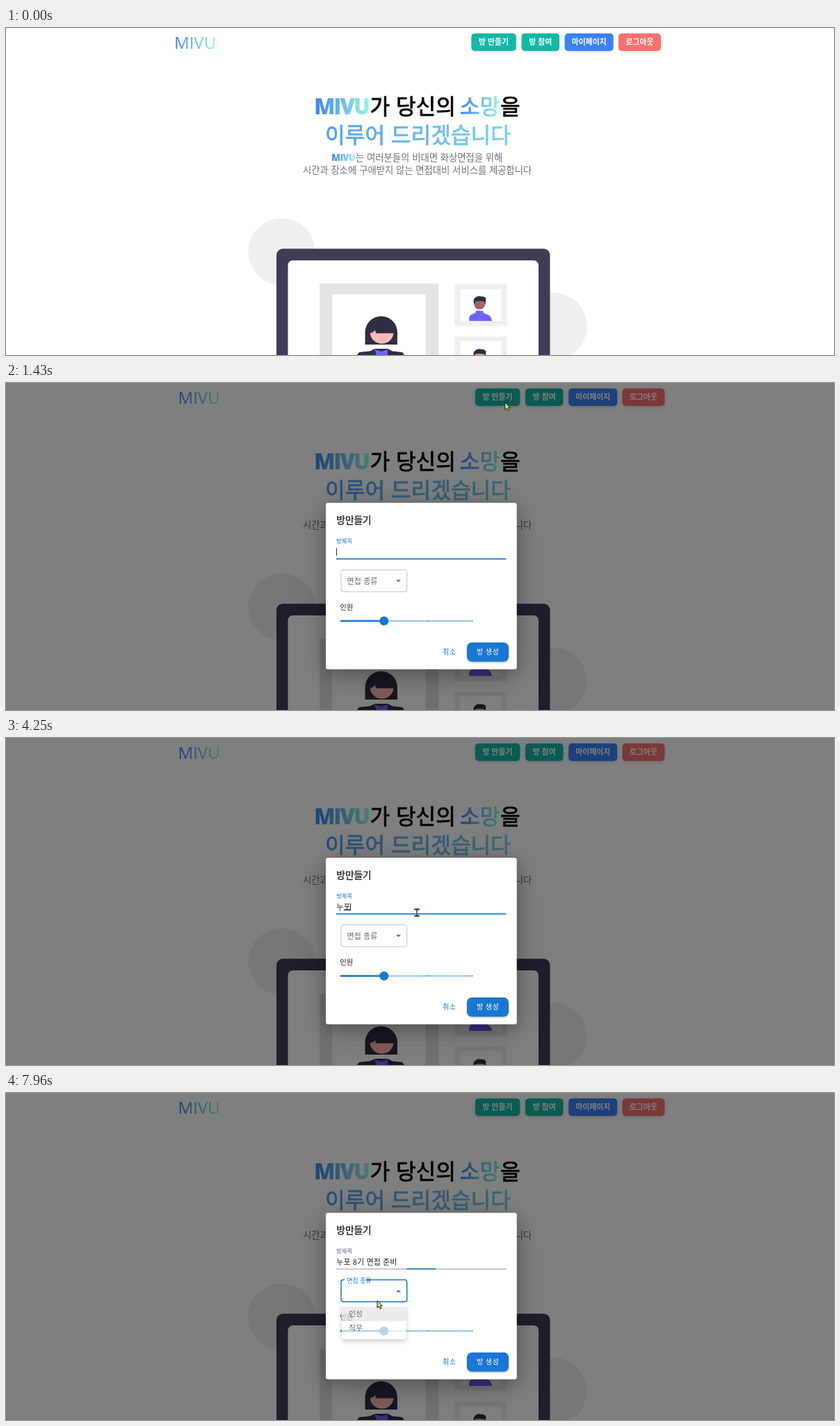
An HTML page for the animation above (8 s loop, 1191 by 470 pixels).

```html
<!DOCTYPE html>
<html lang="ko">
<head>
<meta charset="utf-8">
<title>방만들기</title>
<style>
  html, body { margin: 0; width: 100%; height: 100%; overflow: hidden; background: #fff; }
  svg { display: block; width: 1191px; height: 470px; }
  text { font-family: "Noto Sans CJK KR", "Noto Sans CJK JP", "Noto Sans CJK", sans-serif; white-space: pre; }
  .mark { font-family: "Open Sans", sans-serif; font-weight: 500; fill: url(#brand); }
  .heavy { font-weight: 800; letter-spacing: -.06em; text-anchor: end; stroke: none; }
  .hero { font-size: 31.2px; stroke: #000; stroke-width: .8px; }
  .sub { font-size: 13.35px; fill: #6b7280; }
  .nav text { font-size: 10.9px; font-weight: 700; fill: #fff; text-anchor: middle; }
  .nav rect { filter: drop-shadow(0 2px 2px rgba(0,0,0,.13)); }
  .field { font-size: 11px; letter-spacing: .1px; }
  .action { font-size: 10.2px; font-weight: 500; letter-spacing: .3px; text-anchor: middle; }
  .paper { fill: #fff; filter: drop-shadow(0 7px 10px rgba(0,0,0,.2)) drop-shadow(0 8px 24px rgba(0,0,0,.22)); }
  #menu .paper { filter: drop-shadow(0 3px 4px rgba(0,0,0,.3)); }
</style>
</head>
<body>
<svg viewBox="0 0 1191 470">
  <defs>
    <linearGradient id="brand"><stop stop-color="#3b82f6"/><stop offset="1" stop-color="#99f6e4"/></linearGradient>
    <linearGradient id="wide" href="#brand" gradientUnits="userSpaceOnUse" x1="311" x2="904"/>
  </defs>

  <g id="header">
    <text class="mark" x="242" y="30" font-size="24">MIVU</text>
    <g class="nav" id="nav"></g>
  </g>

  <g class="hero">
    <text class="mark heavy" x="522" y="124">MIVU</text>
    <text x="523.5" y="124">가 당신의</text>
    <text x="653" y="124" fill="url(#brand)" stroke="url(#brand)">소망</text>
    <text x="711" y="124">을</text>
    <text x="459" y="164.5" fill="url(#wide)" stroke="url(#wide)">이루어 드리겠습니다</text>
  </g>
  <g class="sub">
    <text class="mark heavy" x="502" y="191">MIVU</text>
    <text x="503" y="191">는 여러분들의 비대면 화상면접을 위해</text>
    <text x="427" y="208.8">시간과 장소에 구애받지 않는 면접대비 서비스를 제공합니다</text>
  </g>

  <g id="illustration">
    <g fill="#efefef"><circle cx="396.5" cy="321.5" r="48"/><circle cx="787.5" cy="428.5" r="48"/></g>
    <rect x="389" y="317.3" width="393.5" height="200" rx="9" fill="#3f3d56"/>
    <rect x="405.5" y="334" width="360.5" height="200" rx="7" fill="#fff"/>
    <path fill="#e4e4e4" d="M451 367.5h171V480H451z"/>
    <path fill="#fff" d="M469.3 382.5h134.5V480H469.3z"/>
    <path fill="#efefef" d="M645.5 368.5h75v60h-75zM645.5 443.5h75v60h-75z"/>
    <path fill="#fff" d="M653.5 375.5h59V421h-59zM653.5 450h59v45h-59z"/>
    <!-- interviewee -->
    <path fill="#2f2e41" d="M516.5 455V437.5a23.2 23.2 0 0 1 46.4 0V455z"/>
    <path fill="#ffb8b8" d="M523.7 438.5q4.5-.5 7.3-4.500l1 4.7h25.5a17 17 0 0 1-33.8 0z"/>
    <path fill="#2f2e41" d="M505 470l3-4 15-1.5 8-3.5h18l7 3.5 14 1.5 3 4z"/>
    <path fill="#6c63ff" d="M530 462l10 3 9-3v8h-16z"/>
    <!-- small portraits -->
    <path fill="#6c63ff" d="M666 421q0-8 3-9l6-2.5 2-3.5 9 .8 1 3 6 2.2q5 2 6 9z"/>
    <circle cx="681.2" cy="396.5" r="8" fill="#a0616a"/>
    <circle cx="681.2" cy="473" r="8" fill="#ffb8b8"/>
    <path id="hair" fill="#2f2e41" d="M673.5 398q-2.500-8 1.5-10.5 4-3 8-1.8 6-.5 7.5 3.5-.5 1-.6 8.8l-1.700-5q-6-1-9-.5-4-.5-4.500 1z"/>
    <use href="#hair" y="76"/>
  </g>

  <path id="backdrop" d="M0 0h1191v470H0z"/>
  <g id="dialog">
    <rect class="paper" x="460" y="172.3" width="274.7" height="239.2" rx="3"/>
    <text x="475.3" y="201.5" font-size="13.7" fill="#212121" stroke="#212121" stroke-width=".4">방만들기</text>
    <text class="field" id="titleLabel">방제목</text>
    <path d="M475 253h244.5" stroke="#000" stroke-opacity=".42"/>
    <path id="underline" d="M-122.2 252.7h244.4" stroke="#1976d2" stroke-width="1.5"/>
    <text class="field" id="entry" x="475.2" y="246.6" fill="#212121"></text>
    <path id="composing" stroke="#212121" stroke-width=".8"/>
    <path id="caret" d="M.5 237.5v10.5" stroke="#212121"/>

    <rect id="box" x="482" y="268.5" width="94.7" height="31.5" rx="3" fill="none"/>
    <rect id="notch" x="487" y="267" height="3" fill="#fff"/>
    <text class="field" id="typeLabel">면접 종류</text>
    <path id="arrow" d="M-3.5-1.7h7L0 1.8z" fill="#757575"/>

    <text x="480.3" y="325.7" font-size="10.3" font-weight="500" fill="#212121">인원</text>
    <path d="M481 342h190" stroke="#a7caed" stroke-width="2.7"/>
    <path d="M481 342h63" stroke="#1976d2" stroke-width="2.7"/>
    <path d="M606.5 341.3h1.3v1.3h-1.3zM670 341.3h1.3v1.3h-1.3z" fill="#1976d2"/>
    <circle cx="543.8" cy="342" r="6.5" fill="#1976d2"/>

    <text class="action" x="637.7" y="389.6" fill="#1976d2">취소</text>
    <rect x="663" y="373" width="60" height="27.5" rx="7" fill="#1976d2" style="filter:drop-shadow(0 1.5px 1.5px rgba(0,0,0,.3))"/>
    <text class="action" x="693" y="389.6" fill="#fff">방 생성</text>

    <g id="menu">
      <rect class="paper" x="-47.5" width="95" height="53" rx="3"/>
      <path d="M-47.5 4.5h95v21.5h-95z" fill="#e6e6e6"/>
      <g class="field" fill="#212121"><text x="-37" y="18.5">인성</text><text x="-37" y="40">직무</text></g>
    </g>
  </g>

  <g id="pointer">
    <path id="hand" d="M0 0v10.3l2.4-2 2 3.5 1.7-.9-1.8-3.3 3.2-.3z" fill="#d3e06c" stroke="#222"/>
    <g id="beam">
      <path d="M-3.8-4.8h7.6M-3.8 4.7h7.6M0-4.5v9" stroke="#333" stroke-width="2"/>
      <path d="M0-3.5v7" stroke="#c6d27a" stroke-width=".8"/>
    </g>
  </g>
</svg>
<script>
const LOOP = 8000, OPEN = 1190, BLUR = 7859;
const BLUE = '#1976d2';
const el = Object.fromEntries([...document.querySelectorAll('[id]')].map(e => [e.id, e]));
const set = (e, attrs) => { for (const k in attrs) e.setAttribute(k, attrs[k]); };
const show = (e, on) => e.style.display = on ? '' : 'none';
const clamp = v => Math.max(0, Math.min(1, v));
const mix = (a, b, p) => a + (b - a) * p;

el.nav.innerHTML = [
  ['방 만들기', 669.3, 64.5, '#14b8a6'], ['방 참여', 741.5, 54.5, '#14b8a6'],
  ['마이페이지', 803.7, 70, '#3b82f6'], ['로그아웃', 881, 61, '#f87171'],
].map(([label, x, w, color]) =>
  `<rect x="${x}" y="7.7" width="${w}" height="25.3" rx="5" fill="${color}"/>
   <text x="${x + w / 2}" y="24.3">${label}</text>`).join('');

// Progress along cubic-bezier(x1, 0, .2, 1)
function bezier(x1, p) {
  let lo = 0, hi = 1;
  for (let i = 0; i < 20; i++) {
    const u = (lo + hi) / 2, v = 1 - u;
    if (3 * v * v * u * x1 + .6 * v * u * u + u ** 3 < p) lo = u; else hi = u;
  }
  return lo * lo * (3 - 2 * lo);
}
const ease = x1 => (t, start, ms) =>
  t <= start ? 0 : t >= start + ms ? 1 : bezier(x1, (t - start) / ms);
const easeInOut = ease(.4), easeOut = ease(0);

// Hangul is composed one key at a time.
const keys = [
  [OPEN, ''], [3740, 'ㄴ'], [3840, '누'], [4150, '눞'], [4250, '누포'], [4550, '누포 '],
  [4750, '누포 8'], [4950, '누포 8ㄱ'], [5150, '누포 8기'], [5350, '누포 8기 '],
  ...['ㅁ', '며', '면', '멵', '면저', '면접', '면접 ', '면접 ㅈ']
    .map((s, i) => [5550 + i * 102.8, '누포 8기 ' + s]),
  ...[[6460, '주'], [6560, '준'], [6760, '준ㅂ'], [6860, '준비']]
    .map(([t, s]) => [t, '누포 8기 면접 ' + s]),
];

const route = [
  [300, 1172, 458], [1020, 717.7, 28], [1430, 717.7, 28], [1930, 591, 235],
  [2530, 591, 251], [7200, 591, 251], [7780, 534, 298.5],
];
function pointerAt(t) {
  const i = route.findIndex(stop => stop[0] > t);
  if (i < 0) return route[route.length - 1].slice(1);
  if (i === 0) return route[0].slice(1);
  const [t0, x0, y0] = route[i - 1], [t1, x1, y1] = route[i];
  const p = clamp((t - t0) / (t1 - t0)), e = p * p * (3 - 2 * p);
  return [mix(x0, x1, e), mix(y0, y1, e)];
}

const label = (e, x, y, scale, color) =>
  set(e, { transform: `translate(${x} ${y}) scale(${scale})`, fill: color });

function drawEntry(time) {
  const [pressed, text] = keys.filter(k => k[0] <= time).pop() || keys[0];
  const focused = time < BLUR;
  if (el.entry.textContent !== text) el.entry.textContent = text;
  const end = 475 + (text ? el.entry.getComputedTextLength() : 0);
  set(el.caret, { transform: `translate(${Math.round(end)})` });
  show(el.caret, focused && Math.floor((time - pressed) / 530) % 2 === 0);
  set(el.composing, { d: `M${end - 10} 247.6H${end - .5}` });
  show(el.composing, focused && /[^ 8]$/.test(text));
}

function drawField(t) {
  const raise = easeOut(t, OPEN, 200), leave = easeOut(t, BLUR, 200);
  const tone = [25, 118, 210].map(c => Math.round(mix(c, 102, leave)));
  label(el.titleLabel, 475.2, mix(247.3, 229.7, raise), mix(1, .75, raise), `rgb(${tone})`);
  set(el.underline, { transform: `translate(597.2) scale(${raise - leave} 1)` });
}

function drawSelect(t, x, y) {
  const open = t >= BLUR, raise = easeOut(t, BLUR, 200);
  const hover = x > 482 && x < 577 && y > 268 && y < 300;
  set(el.box, {
    stroke: open ? BLUE : hover ? '#212121' : '#c4c4c4',
    'stroke-width': open ? 1.5 : 1,
  });
  set(el.notch, { width: 38 * easeOut(t, BLUR + 50, 100) });
  label(el.typeLabel, 490.5, mix(288.7, 270.3, raise), mix(1, .75, raise), open ? BLUE : '#666');
  set(el.arrow, { transform: `translate(564.5 284.5) scale(1 ${open ? -1 : 1})` });

  const grow = easeInOut(t, BLUR, 148);
  set(el.menu, {
    opacity: easeInOut(t, BLUR, 222),
    transform: `translate(529.3 303) scale(${mix(.75, 1, grow)} ${mix(.5625, 1, grow)})`,
  });
  show(el.menu, open);
}

function draw(time) {
  // Motion advances in steps, about ten a second.
  const t = Math.floor(time / 102) * 102;
  const [x, y] = pointerAt(t);
  const beam = x > 475 && x < 720 && y > 232 && y < 256;
  const fade = easeInOut(t, OPEN, 225);

  set(el.header, { transform: `translate(${time >= 1130 ? 5.5 : 0})` });
  set(el.backdrop, { opacity: fade / 2 });
  set(el.dialog, { opacity: fade });
  drawEntry(time);
  drawField(t);
  drawSelect(t, x, y);

  set(el.pointer, { transform: `translate(${x} ${y})` });
  show(el.pointer, time >= 300);
  show(el.beam, beam);
  show(el.hand, !beam);
}

function tick() {
  draw(performance.now() % LOOP);
  requestAnimationFrame(tick);
}
tick();
</script>
</body>
</html>
```
